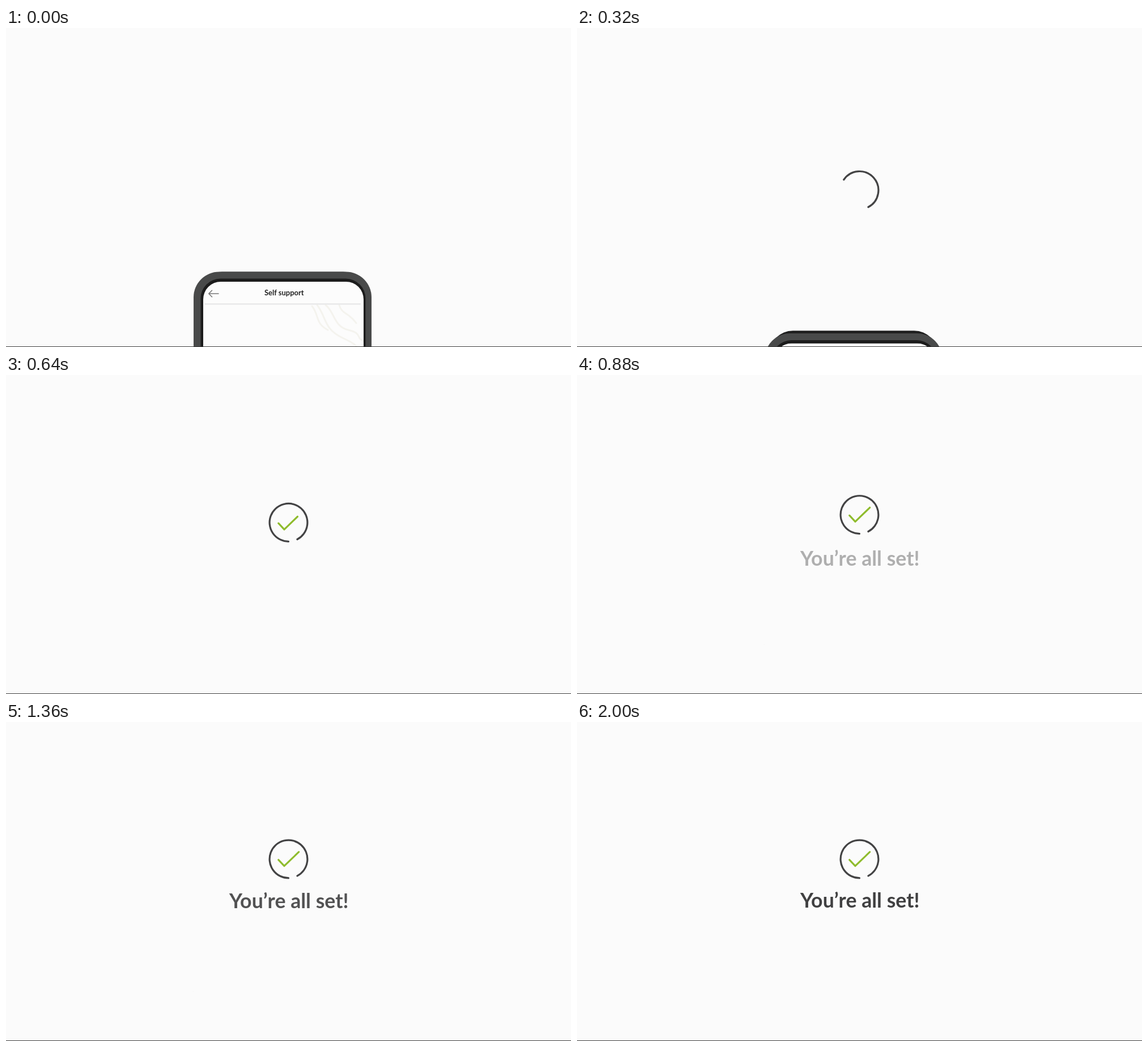
An HTML page that plays this animation: 997x562 px, repeating every 2080 ms.

```html
<!DOCTYPE html>
<html lang="en">
<head>
<meta charset="utf-8">
<title>You’re all set</title>
<style>
  html, body { margin: 0; width: 100%; height: 100%; overflow: hidden; background: #fbfbfb; }
  svg { display: block; width: 100%; height: 100%; }
  text { font-family: Lato, "Open Sans", sans-serif; font-weight: 700; text-anchor: middle; }
  .line { fill: none; stroke-linecap: round; stroke-linejoin: round; }
</style>
</head>
<body>
<svg viewBox="0 0 997 562">
  <defs>
    <clipPath id="screen"><rect x="348" y="447" width="283" height="300" rx="31"/></clipPath>
  </defs>
  <rect width="997" height="562" fill="#fbfbfb"/>

  <g id="phone">
    <rect id="back" x="339" y="429.5" width="298" height="300" rx="42" fill="#1f1f1f"/>
    <rect x="331" y="429.5" width="314" height="300" rx="45" fill="#494a4a"/>
    <rect x="343.5" y="441.5" width="291" height="300" rx="35" fill="#1c1c1c"/>
    <g clip-path="url(#screen)">
      <rect x="348" y="447" width="283" height="300" fill="#fcfcfc"/>
      <g class="line" stroke="#f4f3ee" stroke-width="3">
        <path d="M540 490C553 506 545 520 568 532"/>
        <path d="M549 488C566 510 560 530 594 546S612 560 622 564"/>
        <path d="M564 488C580 500 578 526 604 532S616 546 632 552"/>
        <path d="M588 488C592 504 606 502 618 520"/>
      </g>
      <rect x="350" y="485" width="276" height="2.5" fill="#e9e9ea"/>
    </g>
    <path class="line" stroke="#777" stroke-width="1.6" d="M375 468H358M363.5 462.3L357.8 468L363.5 473.7"/>
    <text x="490.8" y="471.3" font-size="13" fill="#222">Self support</text>
  </g>

  <g id="badge" class="line" stroke-width="3.2">
    <path id="ring" stroke="#434344"/>
    <path id="check" stroke="#8fbc2d" pathLength="1" d="M-17.7 1.3L-7.5 12.2L18.2 -12.6"/>
  </g>

  <text id="message" x="499.3" font-size="35.7" fill="#404041">You’re all set!</text>
  <rect y="561" width="997" height="1" fill="#3c3c3c"/>
</svg>

<script>
  const LOOP = 2080, STEP = 80;
  const RADIUS = 33.4, RING_START = 62.4, RING_SWEEP = 332.4;
  const el = id => document.getElementById(id);
  const [phone, back, badge, ring, check, message] =
    ["phone", "back", "badge", "ring", "check", "message"].map(el);

  const progress = (t, start, duration) => Math.min(1, Math.max(0, (t - start) / duration));
  const easeInOut = u => (1 - Math.cos(Math.PI * u)) / 2;
  const easeOut = u => 1 - (1 - u) ** 2;
  const point = deg => {
    const a = deg * Math.PI / 180;
    return `${(RADIUS * Math.cos(a)).toFixed(2)} ${(RADIUS * Math.sin(a)).toFixed(2)}`;
  };

  function draw(t) {
    // The phone sinks while its rear edge tilts into view.
    const n = Math.min(t / 160, 6);
    phone.setAttribute("transform", `translate(0 ${64.75 * n - 5.25 * n * n})`);
    back.setAttribute("transform", `translate(0 ${-2.4 * n})`);

    const rise = 60 * (Math.max(0, 1040 - t) / 880) ** 1.5;
    badge.setAttribute("transform", `translate(498.5 ${241.5 + rise})`);

    const sweep = RING_SWEEP * easeInOut(progress(t, 0, 550));
    ring.setAttribute("d", sweep > 0
      ? `M${point(RING_START)}A${RADIUS} ${RADIUS} 0 ${+(sweep > 180)} 0 ${point(RING_START - sweep)}`
      : "");

    const ticked = easeOut(progress(t, 400, 320));
    check.setAttribute("stroke-dasharray", `${ticked} 2`);
    check.setAttribute("visibility", ticked > 0 ? "visible" : "hidden");

    const shown = easeOut(progress(t, 640, 1050));
    message.setAttribute("y", 326.5 + 16 * (1 - shown));
    message.setAttribute("opacity", shown);
  }

  const began = performance.now();
  function tick() {
    const t = (performance.now() - began) % LOOP;
    draw(Math.floor(t / STEP) * STEP);
    requestAnimationFrame(tick);
  }
  tick();
</script>
</body>
</html>
```
